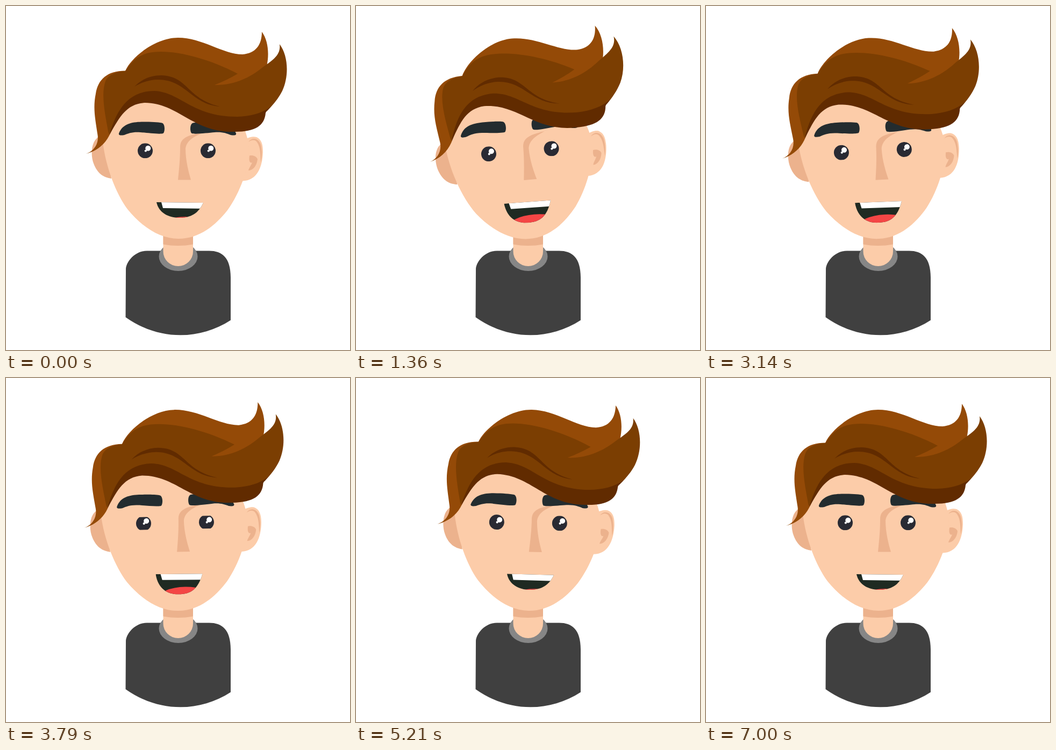
An HTML page for the animation above (7.07 s loop, 640 by 640 pixels).

```html
<!DOCTYPE html>
<html lang="en">
<head>
<meta charset="utf-8">
<title>Talking head</title>
<style>
  html, body { margin: 0; width: 100%; height: 100%; overflow: hidden; background: #fff; }
  svg { display: block; width: 100vw; height: 100vh; }
  .skin { fill: #fccca9; }
  .shade { fill: #ecb28d; }
  .brow { fill: #232c2f; }
  .light { fill: #944a07; }
  .mid { fill: #7b3e02; }
  .dark { fill: #612b00; }
</style>
</head>
<body>
<svg viewBox="0 0 640 640">
  <defs>
    <clipPath id="mouthClip"><path id="mouthShape"/></clipPath>
    <clipPath id="lids"><rect id="lidGap" x="235" width="170"/></clipPath>
    <g id="eye">
      <circle r="14" fill="#292a33"/>
      <circle cx="5.3" cy="-4.5" r="5" fill="#fff"/>
      <circle cx="0.8" cy="0.2" r="2.1" fill="#fff"/>
    </g>
    <path id="brow" class="brow" d="M210 237C217 219 234 216 252 215.5C270 215.5 282 216 290 217.5C296 219 296 232 293 236.5C290 239.5 262 236 250 235C235 234 228 237 220 240C214 241 209 241 210 237Z"/>
  </defs>

  <!-- body -->
  <path fill="#404040" d="M222.5 579L223 490C223 476 240 455.5 262 455.5H378C402 455.5 418 468 418 505V584.5C360 622 285 623 222.5 579Z"/>
  <ellipse cx="320.5" cy="466" rx="36" ry="27" fill="#868686"/>
  <path class="skin" d="M292.5 420V457A27.75 27 0 0 0 348 457V420Z"/>
  <path class="shade" d="M292.5 420V443.5Q320 448.5 348 443.5V420Z"/>

  <g id="head">
    <!-- ears and face -->
    <path class="shade" d="M185 240C158 240 156 275 163 293C170 312 182 319 196 321Z"/>
    <path class="skin" d="M440 250C455 242 464 242 468 245C477 250 478 262 478 272C477 300 467 325 440 325.5Z"/>
    <path class="skin" d="M179 240C182 290 202 345 226 378C252 410 285 433 321 433C360 433 390 408 412 380C436 347 452 300 452 270C452 250 446 235 441 222L400 205L280 170L220 190Z"/>
    <path class="shade" d="M451 253C458 243 470 246 474 258C477 270 476 282 474 291C473 275 474 262 466 252C462 248 456 249 451 253Z"/>
    <path class="shade" d="M453 278.5C458 277 466 279 468 285C467 296 460 306 451 306C452 301 456 297 458 291C455 293 451 290 453 278.5Z"/>
    <path class="shade" d="M320 323.5C323 295 324 280 324 262C324 243 345 239 366 236C350 243 336 250 334 265C334 288 340 310 344 323.5Z"/>

    <g id="brows">
      <use href="#brow"/>
      <use href="#brow" transform="matrix(-1 0 0 1 638 0)"/>
    </g>
    <g clip-path="url(#lids)">
      <use href="#eye" x="259" y="269.3"/>
      <use href="#eye" x="376" y="269.3"/>
    </g>

    <g id="mouth" clip-path="url(#mouthClip)">
      <path fill="#1f2a22" d="M270 355H380V415H270Z"/>
      <ellipse id="tongue" cx="334" rx="50" ry="20" fill="#f44645"/>
      <path fill="#fff" d="M289 360V365L292 376L370 377V360Z"/>
    </g>

    <!-- hair -->
    <path class="light" d="M149 275C163 270 173 257 170.5 240C166 210 161.5 190 167 163C171 137 188 120.5 222 120.5C234 94 279 59 320 59C365 59 404 90 440 90C465 88 476 72 476 48C488 64 490 90 485 112C480 150 400 175 345 185L276 163L225 176L194 237C185 258 168 270 149 275Z"/>
    <path class="mid" d="M191 238C185 205 176 165 185 140C190 128 205 122 222 121C232 107 240 95 262 88C300 78 370 94 431 126C418 134 403 141 388 147C425 148 455 132 475 116C495 101 512 92 509 71C525 92 527 130 514 158C507 172 497 184 486 195L430 218L345 200L276 168L230 180L202 221Z"/>
    <path class="dark" d="M192 240C203 205 220 158 276 158C325 160 345 206 430 206C455 205 476 200 493 187C489 192 484 196 483 199C481 222 465 234 425 234C348 236 322 181 258 180C225 182 212 205 194 237Z"/>
    <path class="dark" d="M239 150C252 136 270 129 289 129C340 131 335 172 398 187C345 183 335 137 283 137C267 137 252 142 239 150Z"/>
  </g>
</svg>
<script>
const LOOP = 7070, STEP = 1000 / 14;
const TILT = [[0, 0], [1570, -5.05], [5400, 1.15], [LOOP, 0]];
const OPEN = [[0, 0], [1300, 1], [3500, 1], [5100, 0], [LOOP, 0]];
const RAISE = [[0, 0], [1570, 6], [2400, 6], [3700, 0], [LOOP, 0]];
const BLINK = { at: 3930, half: 170 };
const $ = id => document.getElementById(id);

// Sine-eased value between [time, value] keys
function ease(keys, t) {
  const i = Math.max(1, keys.findIndex(k => k[0] >= t));
  const [t0, a] = keys[i - 1], [t1, b] = keys[i];
  return a + (b - a) * (1 - Math.cos(Math.PI * (t - t0) / (t1 - t0))) / 2;
}

function draw(t) {
  $('head').setAttribute('transform', `rotate(${ease(TILT, t)} 323 415)`);
  $('brows').setAttribute('transform', `translate(0 ${-ease(RAISE, t)})`);

  const open = ease(OPEN, t), low = 394 + 10 * open;
  $('mouth').setAttribute('transform', `translate(${-open / 2} ${-open})`);
  $('mouthShape').setAttribute('d',
    `M280 365C284 ${low - 9} 303 ${low} 322 ${low}C344 ${low} 358 ${low - 8} 367 366Z`);
  $('tongue').setAttribute('cy', 412 - 2.5 * open);

  const gap = 28 * Math.min(1, Math.abs(t - BLINK.at) / BLINK.half);
  $('lidGap').setAttribute('y', 269.3 - gap / 2);
  $('lidGap').setAttribute('height', gap);
}

const start = performance.now();
function tick() {
  const t = (performance.now() - start) % LOOP;
  draw(Math.min(LOOP, Math.floor((t + 5) / STEP) * STEP));
  requestAnimationFrame(tick);
}
tick();
</script>
</body>
</html>
```
